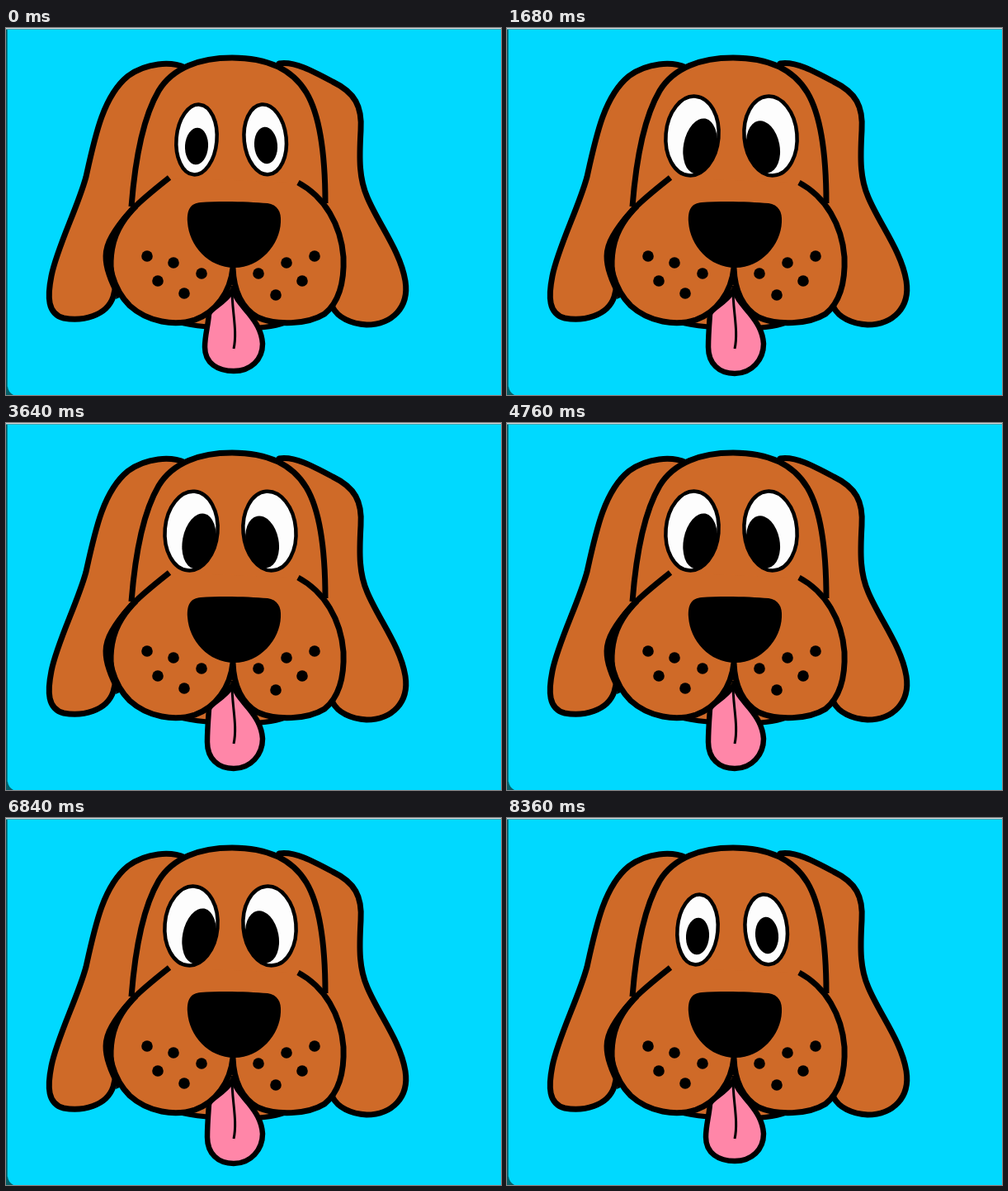
Animation, 600 px wide and 444 px high, one loop 8.4 s. Source, as an HTML page with a canvas:

```html
<!DOCTYPE html>
<html lang="en">
<head>
<meta charset="utf-8">
<title>Dog</title>
<style>
html, body { margin: 0; width: 100%; height: 100%; overflow: hidden; background: #00d9ff; }
canvas { display: block; }
</style>
</head>
<body>
<canvas id="stage" width="600" height="444"></canvas>
<script>
const ctx = document.getElementById('stage').getContext('2d');
const SKY = '#00d9ff', FUR = '#cf6a28', PINK = '#ff86a8', INK = '#000';
const LOOP = 8400, CYCLE = 3000, OFFSET = 360;

const leftEar = new Path2D('M217 48 C200 40 170 42 148 58 C118 82 108 130 97 180 C87 217 62 265 55 300 C50 325 50 346 70 351 C92 355 122 349 130 325 L160 200 Z');
const rightEar = new Path2D('M331 43 C350 40 372 52 396 65 C423 78 432 95 430 124 C428 160 428 182 438 205 C452 238 478 270 484 306 C489 338 468 359 437 359 C418 358 402 350 396 338 L380 200 Z');
const chin = new Path2D('M205 354 C225 364 322 368 340 355 L275 300 Z');
const head = new Path2D('M152 216 C156 165 165 110 185 76 C202 48 235 36 274 36 C314 36 346 48 364 78 C382 108 387 160 387 212');
const muzzle = new Path2D('M198 181 C165 207 139 228 128 257 C121 285 130 316 150 336 C172 356 205 361 229 353 C254 344 272 320 275 290 C276 318 285 338 305 350 C327 360 365 359 386 346 C406 330 410 302 409 277 C406 238 386 204 354 187');
const face = new Path2D('M152 216 L198 181 L354 187 L387 212 L400 280 L275 320 L135 280 Z');
const cheekShade = new Path2D('M153 214 C134 235 121 252 118 270 C116 285 121 300 130 319 C133 322 134 325 133 328 L140 325 C130 305 129 286 132 268 C136 245 149 229 160 218 Z');
const nose = new Path2D('M236 211 C260 209 295 210 317 212 C329 214 334 222 333 235 C332 262 308 290 277 290 C245 290 222 263 220 235 C219 219 224 212 236 211 Z');

const spots = [[171, 276], [203, 284], [184, 306], [237, 297], [216, 321],
               [374, 276], [340, 284], [359, 306], [306, 297], [327, 323]];

// cx, cy, rx, ry, degrees: calm pose then wide pose
const eyes = [
  { white: [[231, 135, 24.5, 42.5, 5], [224.5, 130.5, 32, 48, 5]],
    pupil: [[231, 143, 14, 22.3, 4], [234, 143, 20, 34, 11]] },
  { white: [[314.2, 134.8, 25.5, 42.5, -6], [319.5, 130.5, 32, 48, -5]],
    pupil: [[315, 142, 14, 22.3, -5], [310.5, 144, 20, 32, -11]] }
];

const mix = (a, b, k) => a + (b - a) * k;
const smooth = x => {
  x = Math.min(1, Math.max(0, x));
  return x * x * (3 - 2 * x);
};

function excite(t) {
  const p = (t - OFFSET + CYCLE) % CYCLE;
  // the rise begins just before the cycle turns over
  const rise = smooth(((p > CYCLE - 40 ? p - CYCLE : p) + 30) / 330);
  return rise * (1 - smooth((p - 1400) / 320));
}

function shape(path, fill, width = 7) {
  if (fill) {
    ctx.fillStyle = fill;
    ctx.fill(path);
  }
  if (width) {
    ctx.strokeStyle = INK;
    ctx.lineWidth = width;
    ctx.stroke(path);
  }
}

function oval(poses, k) {
  const [x, y, rx, ry, deg] = poses[0].map((v, i) => mix(v, poses[1][i], k));
  const path = new Path2D();
  path.ellipse(x, y, rx, ry, deg * Math.PI / 180, 0, 7);
  return path;
}

function drawEye(eye, k) {
  const white = oval(eye.white, k);
  shape(white, '#fdfdfd', 0);
  ctx.save();
  ctx.clip(white);
  shape(oval(eye.pupil, k), INK, 0);
  ctx.restore();
  shape(white, null, 4.5);
}

function drawTongue(k) {
  const l = mix(241, 244, k), b = mix(415, 418, k);
  shape(new Path2D(`M275 317 C264 334 249 338 246 346 C245 360 ${l} 372 ${l} 386
    C${l} 406 257 ${b} 276 ${b} C297 ${b} 311 401 311 382
    C310 366 302 355 294 345 C285 334 279 328 275 317 Z`), PINK, 6.5);
  shape(new Path2D('M274 312 C273 340 281 365 276 388'), null, 3);
}

function drawFrame() {
  ctx.fillStyle = SKY;
  ctx.fillRect(0, 0, 600, 444);
  ctx.fillStyle = '#075f68';
  ctx.fillRect(0, 0, 1.7, 444);
  ctx.fill(new Path2D('M0 434 L2 434 Q3 441 9 444 L0 444 Z'));
  ctx.fillStyle = '#d5dcde';
  ctx.fillRect(0, 0, 600, 1);
  ctx.fillStyle = '#4b9fac';
  ctx.fillRect(0, 1, 600, 1);
}

function draw(t) {
  const k = excite(t);
  ctx.lineCap = 'butt';
  ctx.lineJoin = 'round';
  drawFrame();
  shape(leftEar, FUR);
  shape(rightEar, FUR);
  shape(chin, FUR, 6);
  shape(head, FUR);
  shape(face, FUR, 0);
  shape(muzzle, FUR);
  shape(cheekShade, INK, 0);
  shape(nose, INK, 0);
  drawTongue(k);
  ctx.fillStyle = INK;
  for (const [x, y] of spots) {
    ctx.beginPath();
    ctx.arc(x, y, 6.8, 0, 7);
    ctx.fill();
  }
  for (const eye of eyes) drawEye(eye, k);
}

const start = performance.now();
function tick() {
  draw((performance.now() - start) % LOOP);
  requestAnimationFrame(tick);
}
tick();
</script>
</body>
</html>
```
